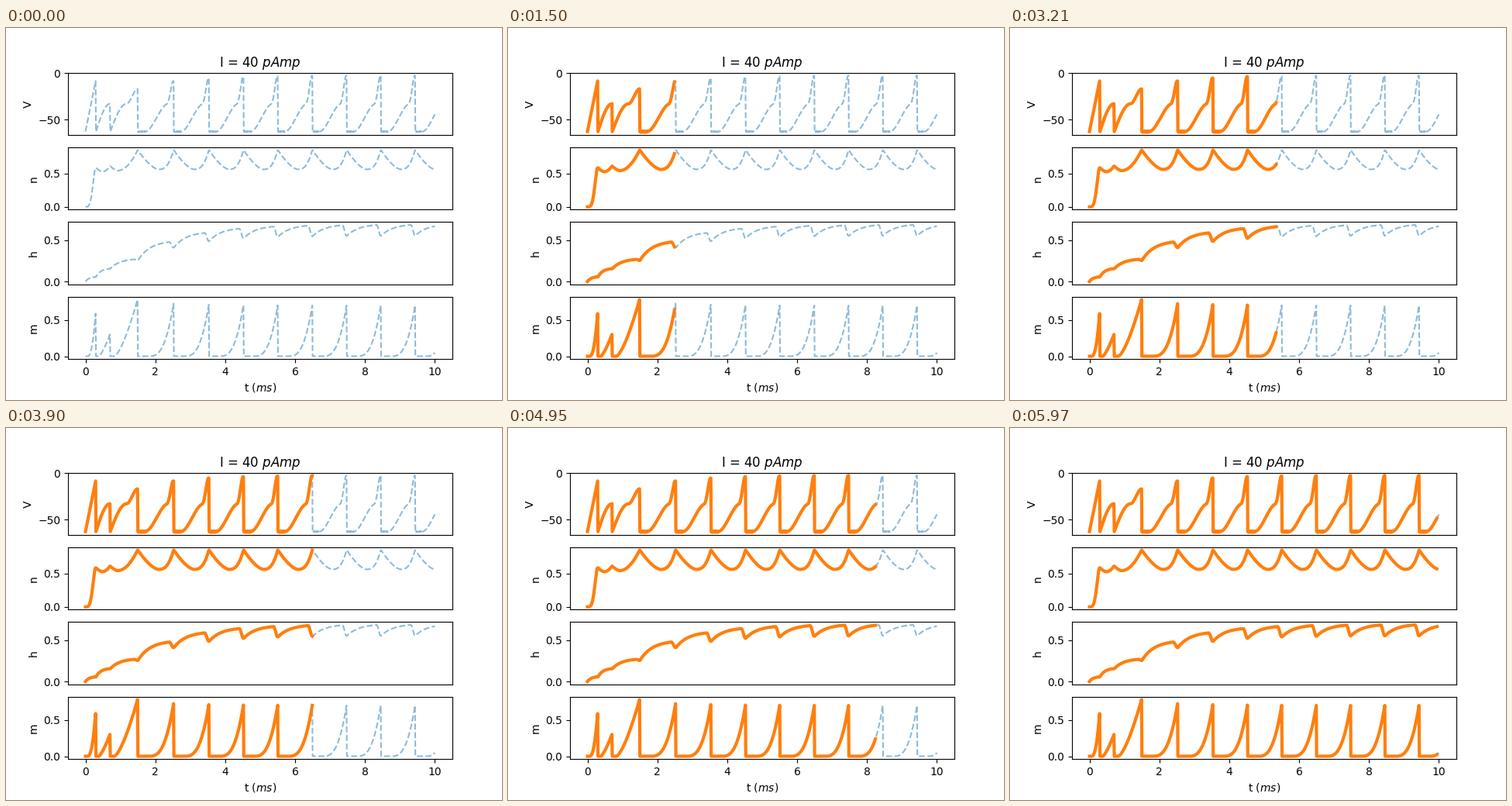
Recreate the animation shown at these times as a matplotlib script. Size 640x480 px, loop 6 s.

```python
import numpy as np
import matplotlib.pyplot as plt
from matplotlib.animation import FuncAnimation

FRAMES, STEP = 200, 5
t = np.linspace(0, 10, FRAMES * STEP + 1)


def ramp(u, start=0, end=1):
    return np.clip((u - start) / (end - start), 0, 1)


def smooth(s):
    return s * s * (3 - 2 * s)


def ease_out(s):
    return np.sin(s * np.pi / 2)


def valley(u, first, low, last, at, power):
    """Fall from first to low at u = at, then climb to last."""
    fall = (first - low) * (1 - ramp(u, 0, at)) ** 1.55
    return low + fall + (last - low) * ramp(u, at) ** power


def relax(u, start, ceiling, end):
    """Saturating growth with a quick drop to end before the reset."""
    y = ceiling - (ceiling - start) * np.exp(-u / 0.35)
    return y + (end - y[-1]) * smooth(ramp(u, 0.88))


def grow(u, peak, delay, power):
    return 0.003 + (peak - 0.003) * ramp(u, delay) ** power


def phase(samples):
    return np.linspace(0, 1, samples)


def startup():
    a, b, c = phase(30), phase(41), phase(79)
    yield (-63 + 54.5 * a, 0.585 * smooth(a ** 2),
           relax(a, 0, 0.059, 0.056), grow(a, 0.585, 0.2, 2.4))
    yield (-63 + 30 * ease_out(b), valley(b, 0.585, 0.527, 0.61, 0.46, 2),
           relax(b, 0.056, 0.162, 0.155), grow(b, 0.3, 0.2, 1.35))
    yield (-63 + 30 * ease_out(ramp(c, 0, 0.6)) + 16 * smooth(ramp(c, 0.6)),
           valley(c, 0.61, 0.543, 0.85, 0.27, 2),
           relax(c, 0.155, 0.278, 0.255), grow(c, 0.775, 0.15, 1.45))


def firing(start=150, h0=0.255):
    """Regular cycles settling geometrically towards a limit cycle."""
    k = 0
    while start < t.size:
        fade = 0.47 ** k
        stop = start + 98 + 5.2 * fade
        u = phase(round(stop) - round(start))
        h1 = 0.555 - 0.145 * fade
        v = (-63 + 30 * smooth(ramp(u, 0.2, 0.85))
             + (30.5 - 6 * fade) * smooth(ramp(u, 0.8, 0.99) ** 1.25))
        v += np.where(u < 0.2, 0.5, 0) * (-1) ** np.arange(u.size)
        yield (v, valley(u, 0.85, 0.562, 0.85, 0.575, 2.75),
               relax(u, h0, 0.697 - 0.2 * fade, h1),
               grow(u, 0.695 + 0.025 * fade, 0.3, 2.9))
        start, h0, k = stop, h1, k + 1


cycles = [*startup(), *firing()]
signals = [np.concatenate(parts)[:t.size] for parts in zip(*cycles)]

fig, axes = plt.subplots(4, 1, figsize=(6.4, 4.8), dpi=100)
traces = []
for ax, name, y in zip(axes, "Vnhm", signals):
    ax.plot(t, y, "--", color="C0", alpha=0.5)
    traces.append(ax.plot([], [], color="C1", lw=3)[0])
    ax.set_ylabel(name)
    if ax is not axes[-1]:
        ax.set_xticks([])
axes[0].set_title("I = 40 $pAmp$", pad=5.4)
axes[-1].set_xlabel("t ($ms$)")


def update(i):
    end = i * STEP
    for line, y in zip(traces, signals):
        line.set_data(t[:end], y[:end])
    return traces


anim = FuncAnimation(fig, update, frames=FRAMES, interval=30,
                     repeat=True, repeat_delay=0)
plt.show()
```
